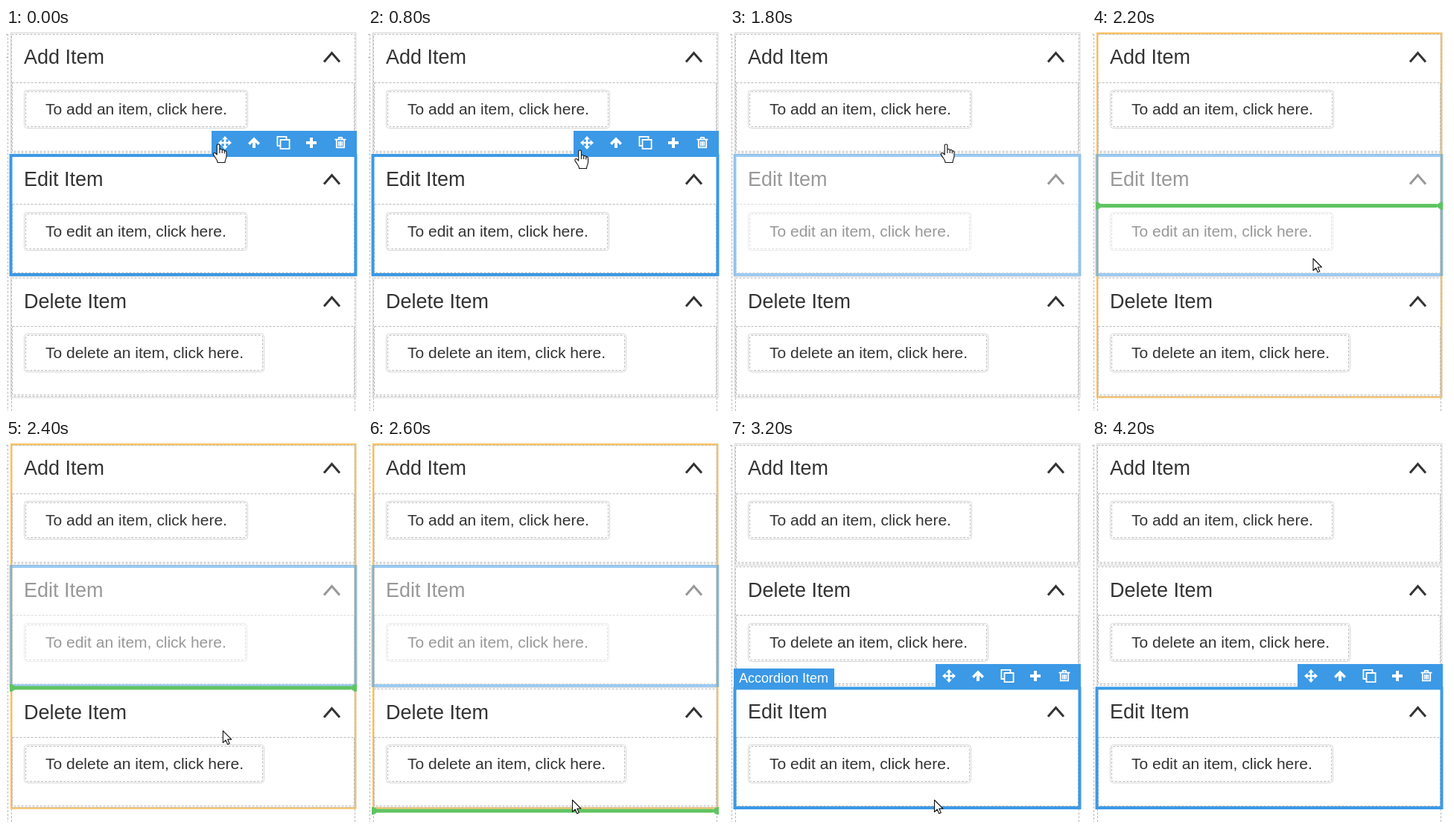
Recreate the animation shown at these times as an HTML page. Size 478x514 px, loop 5.59 s.

```html
<!DOCTYPE html>
<html lang="en">
<head>
<meta charset="utf-8">
<title>Reordering accordion items</title>
<style>
  html, body { margin: 0; width: 100%; height: 100%; overflow: hidden; background: #fff; }
  svg { display: block; width: 478px; height: 514px; }
  text { font-family: "Liberation Sans", Arial, sans-serif; fill: #333; }
  .title { font-size: 27px; }
  .link { font-size: 21px; }
  .dash { fill: none; stroke: #b9b9b9; stroke-dasharray: 3 2; }
  .soft { fill: none; stroke: #d6d6d6; }
  .chevron { fill: none; stroke: #333; stroke-width: 3; }
  .select { fill: none; stroke: #3b99e6; stroke-width: 4; }
  .tag text { font-size: 18px; fill: #fff; }
  .tip { font: 12px "Open Sans", sans-serif; fill: #575757; }
  .blue { fill: #3b99e6; }
  .icon { fill: #fff; }
  .line { fill: none; stroke: #fff; stroke-width: 1.8; }
  .cursor { fill: #fff; stroke: #111; stroke-width: 1.1; stroke-linejoin: round; }
</style>
</head>
<body>
<svg id="stage" viewBox="0 0 478 514"></svg>
<script>
const LOOP = 5590, STEP = 200 / 3;
const stage = document.getElementById("stage");

const path = (cls, d) => `<path class="${cls}" d="${d}"/>`;
const rect = (cls, x, y, r, b, rx = 0) =>
  `<rect class="${cls}" x="${x}" y="${y}" width="${r - x}" height="${b - y}" rx="${rx}"/>`;
const at = (x, y, body) => `<g transform="translate(${x} ${y})">${body}</g>`;

const item = (verb, right) => `<g id="${verb}">
  <g class="frame">
    ${rect("dash", 7.5, 8.5, 468.5, 167.5)}
    ${rect("dash", 8.5, 73.5, 467.5, 165.5)}
  </g>
  <g class="head">
    <text class="title" x="24" y="48">${verb} Item</text>
    ${path("chevron", "M427 45.5L437.5 33.5L448 45.5")}
  </g>
  <g class="body">
    ${rect("soft", 24.5, 83.5, right, 134.5, 4)}
    ${rect("dash", 26.5, 85.5, right - 2, 132.5, 2)}
    <text class="link" x="53" y="116">To ${verb.toLowerCase()} an item, click here.</text>
  </g>
  ${verb === "Edit" ? '<rect id="select" class="select" x="6.5" width="463"/>' : ""}
</g>`;

const icons = [
  at(294, 154, path("icon", "M0-9L4-4.5H1.3V-1.3H4.5V-4L9 0L4.5 4V1.3H1.3V4.5H4L0 9L-4 4.5H-1.3V1.3H-4.5V4L-9 0L-4.5-4V-1.3H-1.3V-4.5H-4Z")),
  at(333, 154, path("icon", "M0-7.5L8 .5L5.5 3L2-.5V7H-2V-.5L-5.5 3L-8 .5Z")),
  at(372.5, 154, path("line", "M-4 4H-8.1V-8.1H4V-4M-4-4H8.1V8.1H-4Z")),
  at(410, 154, path("icon", "M-2-7H2V-2H7V2H2V7H-2V2H-7V-2H-2Z")),
  at(449, 154, path("line", "M-7.5-4.3H7.5M-2.8-4.5L-2-7H2L2.8-4.5M-5.2-4V6.4H5.2V-4M-2.3-2V4.5M0-2V4.5M2.3-2V4.5"))
].join("");

stage.innerHTML = `
  ${path("dash", "M2.5 8V514M0 8.5H2M0 39.5H2M7.5 496V514M468.5 496V514")}
  ${rect("soft", 6.5, 6.5, 470, 496)}
  ${path("soft", "M7 169.5H469M7 333.5H469")}
  <rect id="zone" x="7.2" y="7.2" width="461.8" height="488" fill="none" stroke="#fbc363" stroke-width="2.6"/>
  ${item("Add", 324.5)}${item("Delete", 346.5)}${item("Edit", 323.5)}
  <g id="tools">${rect("blue", 276, 138, 471, 171)}${icons}</g>
  <g id="tag" class="tag">${rect("blue", 5, 144, 140, 171)}<text x="12" y="163">Accordion Item</text></g>
  <g id="drop" fill="#5fc461">
    <path d="M8-2.5H463V2.5H8Z"/>
    <path d="M5-5H8L13-1.5V1.5L8 5H5ZM471-5H468L463-1.5V1.5L468 5H471Z"/>
  </g>
  <g id="tip"><rect x="288.5" y="504.5" width="95" height="20" fill="#fff" stroke="#767676"/>
    <text class="tip" x="294" y="518">Accordion Item</text></g>
  <path id="arrow" class="cursor" d="M0 .5V16.5L3.7 13L6.2 18.7L8.8 17.6L6.3 12H11.4Z"/>
  <path id="hand" class="cursor" d="M-1.8 14V1.8C-1.8-.6 1.9-.6 1.9 1.8V8C2-.0 2 6.2 3.6 6.4C5.2 6.5 5.4 7.2 5.4 8.2C6 7 8.4 7.2 8.4 9.2C9.4 8.4 11 9 11 10.8V16C11 19 9 20.5 9 24.5H-.8C-1-21 -1 22-2.6 20L-6.4 14.4C-7.6 12-5 10.6-3.6 12.2Z"/>`;

const el = {};
stage.querySelectorAll("[id]").forEach(e => el[e.id] = e);
// One clean outline for the pointing hand.
el.hand.setAttribute("d", "M-1.8 14V1.8C-1.8-.6 1.9-.6 1.9 1.8V7.6C2.4 6 5.2 6.2 5.2 8.2C6 7 8.3 7.4 8.3 9.2C9.4 8.4 11 9.2 11 10.8V16C11 19 9 20.5 9 24.5H-1C-1 22.5-1.4 21.6-2.6 20L-6.4 14.4C-7.6 12-5 10.6-3.6 12.2ZM1.9 7.6V12M5.2 8.2V12M8.3 9.2V12.5");

const pointer = [
  [733, 285, 156], [867, 284, 172], [1000, 285, 197], [1067, 286, 195],
  [1200, 290, 168], [1267, 292, 161], [1333, 290, 160], [1600, 290, 156],
  [1800, 290, 156], [1933, 291, 180], [2200, 297, 309], [2333, 297, 360],
  [2600, 274.5, 484], [3933, 274.5, 484], [4000, 277, 420], [4200, 290, -30]
];
const dropLine = [[2133, 169], [2200, 238.5], [2333, 334], [2400, 334], [2600, 499]];

function sample(keys, t) {
  const i = keys.findIndex(k => k[0] > t);
  if (i === 0) return keys[0].slice(1);
  if (i < 0) return keys[keys.length - 1].slice(1);
  const [a, b] = [keys[i - 1], keys[i]];
  const f = (t - a[0]) / (b[0] - a[0]);
  return a.slice(1).map((v, n) => v + (b[n + 1] - v) * f);
}

const show = (e, on) => e.setAttribute("visibility", on ? "visible" : "hidden");
const move = (e, x, y) => e.setAttribute("transform", `translate(${x} ${y})`);

function place(id, frame, head, body) {
  [["frame", frame], ["head", head], ["body", body]].forEach(([part, y]) =>
    move(el[id].querySelector("." + part), 0, y));
}

function draw(time) {
  const t = Math.floor((time + 3.4) / STEP) * STEP + 0.01;
  const during = (from, to) => t >= from - 4 && t < to - 4;
  const swapped = t >= 3130;
  const dragging = during(1800, 3130);

  if (swapped) {
    place("Edit", 327, 327, 327);
    place("Delete", 163, 164, 164);
  } else {
    place("Edit", 163, 164, 164);
    place("Delete", 327, 328, 327);
  }
  el.select.setAttribute("y", swapped ? 334.5 : 171);
  el.select.setAttribute("height", swapped ? 160.5 : 160);
  el.Edit.setAttribute("opacity", dragging ? 0.5 : 1);

  show(el.tools, !dragging);
  move(el.tools, 0, swapped ? 164 : 0);
  show(el.tag, during(870, 1270) || during(3200, 4070));
  move(el.tag, 0, swapped ? 164 : 0);
  show(el.zone, during(1930, 3000));
  show(el.drop, during(1930, 3000));
  move(el.drop, 0, sample(dropLine, t)[0]);
  show(el.tip, during(3470, 4000));

  const arrow = during(870, 1270) || t >= 1866;
  const [x, y] = sample(pointer, t);
  show(el.arrow, arrow && t < 4196);
  show(el.hand, !arrow);
  move(el.arrow, x, y);
  move(el.hand, x, y);
}

const start = performance.now();
function tick() {
  draw((performance.now() - start) % LOOP);
  requestAnimationFrame(tick);
}
draw(0);
requestAnimationFrame(tick);
</script>
</body>
</html>
```
